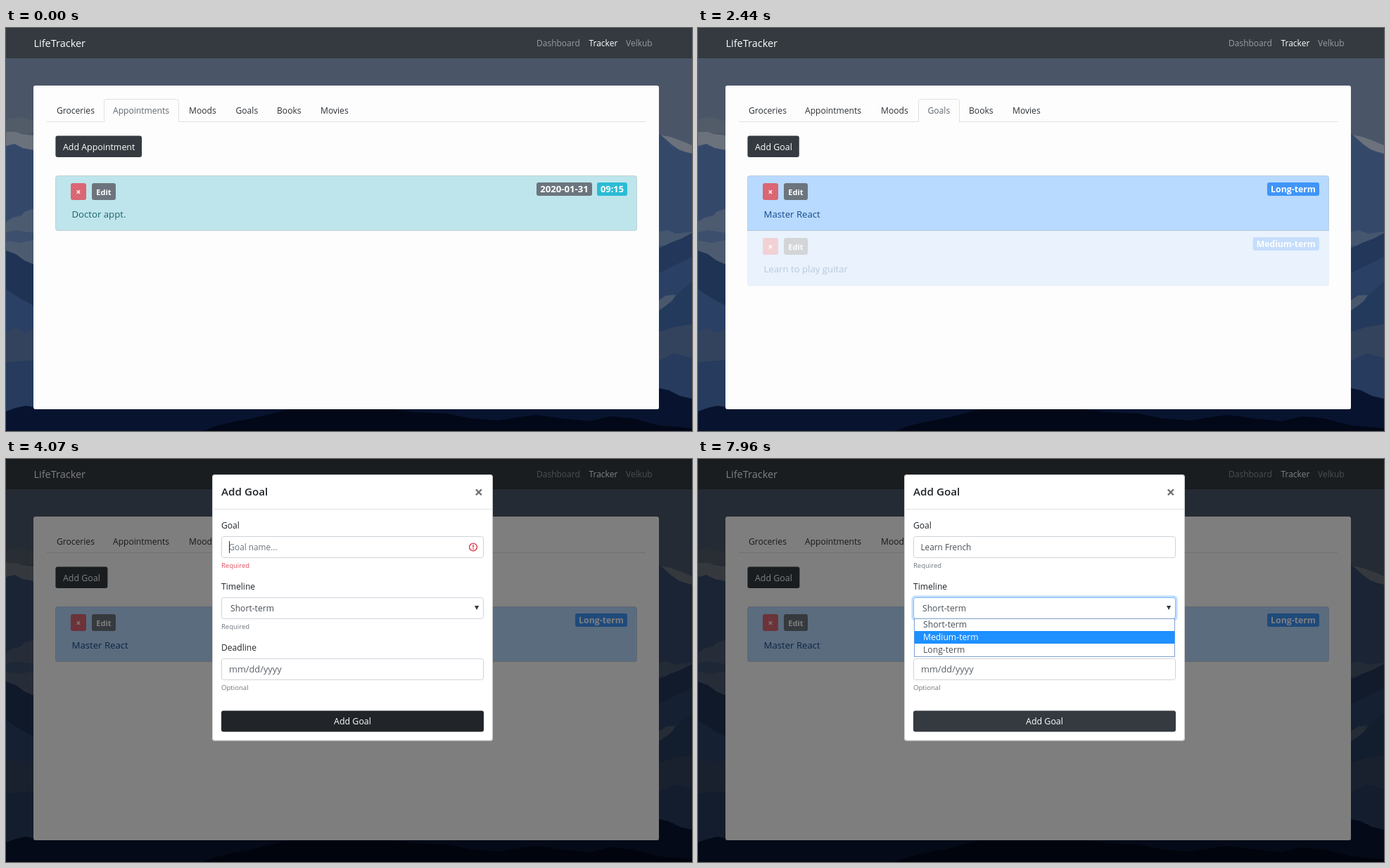
Write an HTML page that moves like this. It is 975 by 574 pixels and loops after 8000 ms.

```html
<!DOCTYPE html>
<html lang="en">
<head>
<meta charset="utf-8">
<title>LifeTracker</title>
<style>
  html, body { margin: 0; width: 100%; height: 100%; overflow: hidden; background: #4a5668; }
  svg { display: block; width: 975px; height: 574px; font-family: "Open Sans", "Noto Sans", sans-serif; }
  text { white-space: pre; }
</style>
</head>
<body>
<svg id="stage" viewBox="0 0 975 574" xmlns="http://www.w3.org/2000/svg"></svg>
<script>
const LOOP = 8000;
// Moments at which the picture is refreshed
const STEPS = [0, 710, 1260, 1340, 1410, 1530, 1570, 1890, 1970, 2280, 2360, 2440, 2520, 2670, 2990,
  3140, 3310, 3380, 3460, 3540, 3620, 3700, 3770, 3920, 4070, 4150, 4230, 4610, 4840, 4920, 5000,
  5150, 5230, 5380, 5550, 5620, 5850, 6310, 6480, 6560, 6630, 7180, 7330, 7410, 7730, 7810, 7960];
// [time, number of letters typed]
const TYPING = [[4840, 1], [5150, 2], [5230, 3], [5380, 4], [5550, 5], [5620, 6], [5850, 7],
  [6310, 9], [6480, 10], [6560, 11], [6630, 12]];
const GOAL = 'Learn French';
const TABS = [['Groceries', 72], ['Appointments', 152], ['Moods', 260], ['Goals', 326.5], ['Books', 385], ['Movies', 447]];
const CARD = '#fdfdfd', DARK = '#343a40', GREY = '#6c757d', LINE = '#dee2e6', RED = '#dc3545';

const text = (x, y, str, size, fill, more = '') =>
  `<text x="${x}" y="${y}" font-size="${size}" fill="${fill}" ${more}>${str}</text>`;
const rect = (x, y, w, h, fill, more = '') =>
  `<rect x="${x}" y="${y}" width="${w}" height="${h}" fill="${fill}" ${more}/>`;
const shape = (d, fill, more = '') => `<path d="${d}" fill="${fill}" ${more}/>`;
const BOLD = 'font-weight="700"', MID = 'text-anchor="middle"';

// Box outline with separate top and bottom corner radii
const box = (x, y, w, h, a, b) =>
  `M${x} ${y + a}q0 ${-a} ${a} ${-a}h${w - 2 * a}q${a} 0 ${a} ${a}v${h - a - b}` +
  `q0 ${b} ${-b} ${b}h${2 * b - w}q${-b} 0 ${-b} ${-b}z`;
const tabPath = (x, w) => `M${x} 134V104.5q0 -3 3 -3h${w - 6}q3 0 3 3V134`;

const scenery = () => [
  ['#525c69', 'M0 130L18 127 40 133V150H0z'],
  ['#6b727c', 'M0 148L14 148 22 151 40 153V176H0z'],
  ['#34496a', 'M0 168L12 165 24 171 40 174V290H0z'],
  ['#4c5b70', 'M0 276L10 270 22 267 26 262 40 257V345H0z'],
  ['#3c4f6d', 'M0 291L14 288 40 292V302L20 306 0 303z'],
  ['#1f3354', 'M0 317L14 322 26 331 40 337V405H0z'],
  ['#2a4064', 'M0 372L20 385 40 396V574H0z'],
  ['#34435d', 'M0 433L14 427 26 434 40 428V476H0z'],
  ['#263b5d', 'M0 476L40 473V574H0z'],
  ['#6b727c', 'M928 152L944 155 958 160 975 167V185H928z'],
  ['#34496a', 'M928 150L936 157 946 166 956 173 964 176 975 179V574H928z'],
  ['#46566e', 'M928 290L940 288 952 293 975 290V310H928z'],
  ['#223759', 'M928 314L944 306 960 300 975 292V400H928z'],
  ['#2a4064', 'M928 349L950 338 975 326V420H928z'],
  ['#4a586d', 'M928 388L938 381 952 380 946 390 928 402z'],
  ['#243a5c', 'M928 404L946 389 960 374 975 361V460H928z'],
  ['#34435d', 'M928 433L950 426 975 422V470L950 463 928 474z'],
  ['#263b5d', 'M928 474L950 463 975 470V574H928z'],
  ['#08142f', 'M0 546L14 541 28 538 40 540V543H928V513L942 516 958 524 975 528V574H0z'],
  ['#020818', 'M280 574L298 567 318 562 350 556 378 549 402 543H548L580 547 626 549 660 556 700 559 724 555 752 551 790 556 830 560 858 553 890 556 928 566 975 570V574z']
].map(([c, d]) => shape(d, c)).join('');

const badge = (x, y, w, str, size, fill) =>
  rect(x, y, w, 19, fill, 'rx="3"') + text(x + w / 2, y + 14.3, str, size, '#fff', `${BOLD} ${MID}`);

const item = (id, y, d, fill, ink, str, badges) => `<g id="${id}">` +
  shape(d, fill, 'stroke="#000" stroke-opacity=".125"') +
  rect(92, y + 11, 22, 24, '#da6773', 'rx="3"') +
  text(103, y + 28.2, '×', 12, '#fff', `${BOLD} ${MID}`) +
  rect(122, y + 11, 34, 24, GREY, `rx="3" id="${id}Edit"`) +
  text(139, y + 27.6, 'Edit', 11, '#fff', `${BOLD} ${MID}`) +
  text(93.5, y + 60, str, 13.2, ink) + badges + '</g>';

const addButton = (w, str, id) => rect(70.4, 153.4, w, 30.6, DARK, `rx="3" id="${id}"`) +
  text(81, 173.6, str, 12.4, '#fff');

const field = (y, id) => rect(306.5, y + .5, 372, 30, '#fff', 'rx="3" stroke="#ced4da"') + (id || '');
const ring = (id, y, line, glow) => `<g id="${id}" opacity="0">` +
  rect(304.7, y - 1.3, 375.6, 33.6, 'none', `rx="4" stroke="${glow}" stroke-opacity=".25" stroke-width="2.6"`) +
  rect(306.5, y + .5, 372, 30, 'none', `rx="3" stroke="${line}"`) + '</g>';

const page = () => scenery() +
  rect(0, 0, 975, 43, DARK) + rect(0, 0, 975, 1, '#2b3035') + rect(0, 42, 975, 1, '#2e3338') +
  text(39.5, 27, 'LifeTracker', 14.5, '#fff') +
  text(754, 25.6, 'Dashboard', 12, '#999c9f') +
  text(828.5, 25.6, 'Tracker', 12, '#fff') +
  text(881, 25.6, 'Velkub', 12, '#999c9f') +
  rect(39, 82, 889, 461, CARD, 'rx="3"') +
  rect(58, 133, 851, 1, LINE) +
  shape(tabPath(313.5, 58), 'none', 'id="hoverTab" stroke="#e9ecef"') +
  shape('', CARD, `id="activeTab" stroke="${LINE}"`) +
  TABS.map(([s, x]) => text(x, 122.4, s, 12.1, '#2b3035', `id="tab${s}"`)).join('') +
  '<g id="visits">' + addButton(122.6, 'Add Appointment', 'addVisit') +
  item('visit', 210, box(70.5, 210.5, 826, 78, 3, 3), '#bee5eb', '#1c6270', 'Doctor appt.',
    badge(754, 220, 79, '2020-01-31', 13.2, GREY) + badge(840, 220, 43, '09:15', 12.8, '#2bbcd5')) + '</g>' +
  '<g id="goals">' + addButton(73.4, 'Add Goal', 'addGoal') +
  item('second', 288, box(70.5, 288.5, 826, 78.5, 0, 3), '#b8daff', '#12498a', 'Learn to play guitar',
    badge(788.5, 298, 94.5, 'Medium-term', 12.2, '#3f95f8')) +
  item('first', 210, '', '#b8daff', '#12498a', 'Master React',
    badge(809, 220, 74, 'Long-term', 12.3, '#3f95f8')) + '</g>';

const option = (y, str, i) => rect(307.5, y, 370, 18, '#1e90ff', `id="pick${i}"`) +
  text(320, y + 13.3, str, 12.2, '#495057', `id="opt${i}"`);

const dialog = () => rect(0, 0, 975, 574, '#000', 'id="shade"') + '<g id="modal">' +
  rect(293, 22, 399, 379.4, '#fff', 'rx="4"') +
  rect(293.5, 22.5, 398, 378.4, 'none', 'rx="4" stroke="#000" stroke-opacity=".2"') +
  text(306, 52.4, 'Add Goal', 15.2, '#212529', 'font-weight="600"') +
  text(672, 54.8, '×', 21.5, '#6f6f6f', `${BOLD} ${MID}`) +
  rect(293, 71, 399, 1, LINE) +
  text(306, 98.8, 'Goal', 12.1, '#212529') + field(110) +
  ring('redRing', 110, RED, RED) + ring('blueRing', 110, '#80bdff', '#007bff') +
  text(316.5, 130.3, 'Goal name...', 11.8, GREY, 'id="hint"') +
  text(316.5, 130.3, '', 11.8, '#495057', 'id="typed"') +
  rect(317, 117, 1, 17, '#333', 'id="caret"') +
  `<g id="alert"><circle cx="664" cy="125.5" r="5.4" fill="none" stroke="${RED}" stroke-width="1.4"/>` +
  rect(663.3, 122, 1.5, 4.3, RED) + rect(663.3, 127.4, 1.5, 1.5, RED) + '</g>' +
  text(306, 155.4, 'Required', 9.5, GREY, 'id="need"') +
  text(306, 185.8, 'Timeline', 12.1, '#212529') + field(197) + ring('selectRing', 197, '#80bdff', '#007bff') +
  text(319, 217, 'Short-term', 12.15, '#495057') +
  shape('M666 209h6.2l-3.1 6z', '#343a40') +
  text(306, 242, 'Required', 9.5, GREY) +
  text(306, 272.6, 'Deadline', 12.1, '#212529') + field(284) +
  text(317, 304, 'mm/dd/yyyy', 12.8, '#5a6067') +
  shape('M643 298l3.5 -4 3.5 4zM643 301l3.5 4 3.5 -4zM657 297h8l-4 6z', '#5a6067', 'id="spinner"') +
  text(306, 329.4, 'Optional', 9.6, GREY) +
  rect(306, 358.6, 373, 29.8, DARK, 'rx="3" id="submit"') +
  text(492.5, 378, 'Add Goal', 12.4, '#fff', MID) +
  '<g id="menu">' + rect(307.5, 227.5, 370, 54, '#fff', 'stroke="#7f9fce"') +
  option(227, 'Short-term', 0) + option(245, 'Medium-term', 1) + option(263, 'Long-term', 2) + '</g></g>';

const stage = document.getElementById('stage');
stage.innerHTML = page() + dialog();
const el = {};
stage.querySelectorAll('[id]').forEach(n => el[n.id] = n);

const set = (id, name, value) => el[id].setAttribute(name, value);
const fade = (id, v) => { set(id, 'opacity', v); set(id, 'display', v > 0 ? 'inline' : 'none'); };
const show = (id, on) => fade(id, on ? 1 : 0);
const ramp = (t, start, len) => Math.min(1, Math.max(0, (t - start) / len));
const within = (t, a, b) => t >= a && t < b;

// CSS ease-out, cubic-bezier(0, 0, .58, 1)
function easeOut(p) {
  let lo = 0, hi = 1;
  for (let i = 0; i < 20; i++) {
    const m = (lo + hi) / 2;
    if (3 * (1 - m) * m * m * .58 + m * m * m < p) lo = m; else hi = m;
  }
  return lo * lo * (3 - 2 * lo);
}

function drawPage(t) {
  const goals = t >= 1260;
  show('hoverTab', within(t, 710, 1260));
  set('activeTab', 'd', goals ? tabPath(313.5, 58) : tabPath(139.5, 106));
  set('tabGoals', 'fill', goals ? '#5f666d' : '#2b3035');
  set('tabAppointments', 'fill', goals ? '#2b3035' : '#5f666d');
  fade('visits', 1 - ramp(t, 1175, 150));
  fade('goals', ramp(t, 1325, 150));
  set('secondEdit', 'fill', within(t, 1890, 1970) ? '#5a6268' : GREY);
  fade('second', 1 - ramp(t, 2240, 280));
  set('first', 'data-last', t >= 2670);
  set('addGoal', 'width', t >= 2990 ? 74 : 73.4);
  el.first.firstChild.setAttribute('d', box(70.5, 210.5, 826, 78, 3, t >= 2670 ? 3 : 0));
}

function drawDialog(t) {
  fade('shade', .5 * ramp(t, 3290, 150));
  fade('modal', ramp(t, 3430, 150));
  set('modal', 'transform', `translate(0 ${-40 * (1 - easeOut(ramp(t, 3430, 300)))})`);

  const bad = within(t, 4070, 4840);
  const turn = ramp(t, 4830, 150), leave = ramp(t, 7680, 120);
  fade('redRing', ramp(t, 4080, 150) * (1 - turn));
  fade('blueRing', turn * (1 - leave));
  fade('selectRing', leave);
  show('alert', bad);
  set('need', 'fill', bad ? '#e04d5b' : GREY);
  set('submit', 'fill', within(t, 3920, 4070) ? '#23272b' : within(t, 4070, 4150) ? '#212529' :
    within(t, 4150, 4230) ? '#2c3136' : DARK);

  const count = TYPING.reduce((n, [at, c]) => t >= at ? c : n, 0);
  show('hint', !count);
  el.typed.textContent = GOAL.slice(0, count);
  const end = count ? el.typed.getComputedTextLength() : 0;
  set('caret', 'x', Math.round(316.5 + end));
  show('caret', within(t, 4070, 4610) || within(t, 4840, 7180));

  show('spinner', within(t, 7330, 7410));
  show('menu', t >= 7730);
  const pick = t >= 7960 ? 1 : 0;
  for (let i = 0; i < 3; i++) {
    show('pick' + i, i === pick);
    set('opt' + i, 'fill', i === pick ? '#fff' : '#495057');
  }
}

let last = -1;
function frame(now) {
  const ms = now % LOOP;
  const t = STEPS.reduce((a, s) => s <= ms ? s : a, 0);
  if (t !== last) {
    drawPage(t);
    drawDialog(t);
    last = t;
  }
  requestAnimationFrame(frame);
}
const start = performance.now();
const tick = now => frame.call(null, now);
drawPage(0);
drawDialog(0);
requestAnimationFrame(function run(now) {
  const ms = Math.max(0, now - start) % LOOP;
  const t = STEPS.reduce((a, s) => s <= ms ? s : a, 0);
  if (t !== last) { drawPage(t); drawDialog(t); last = t; }
  requestAnimationFrame(run);
});
</script>
</body>
</html>
```
